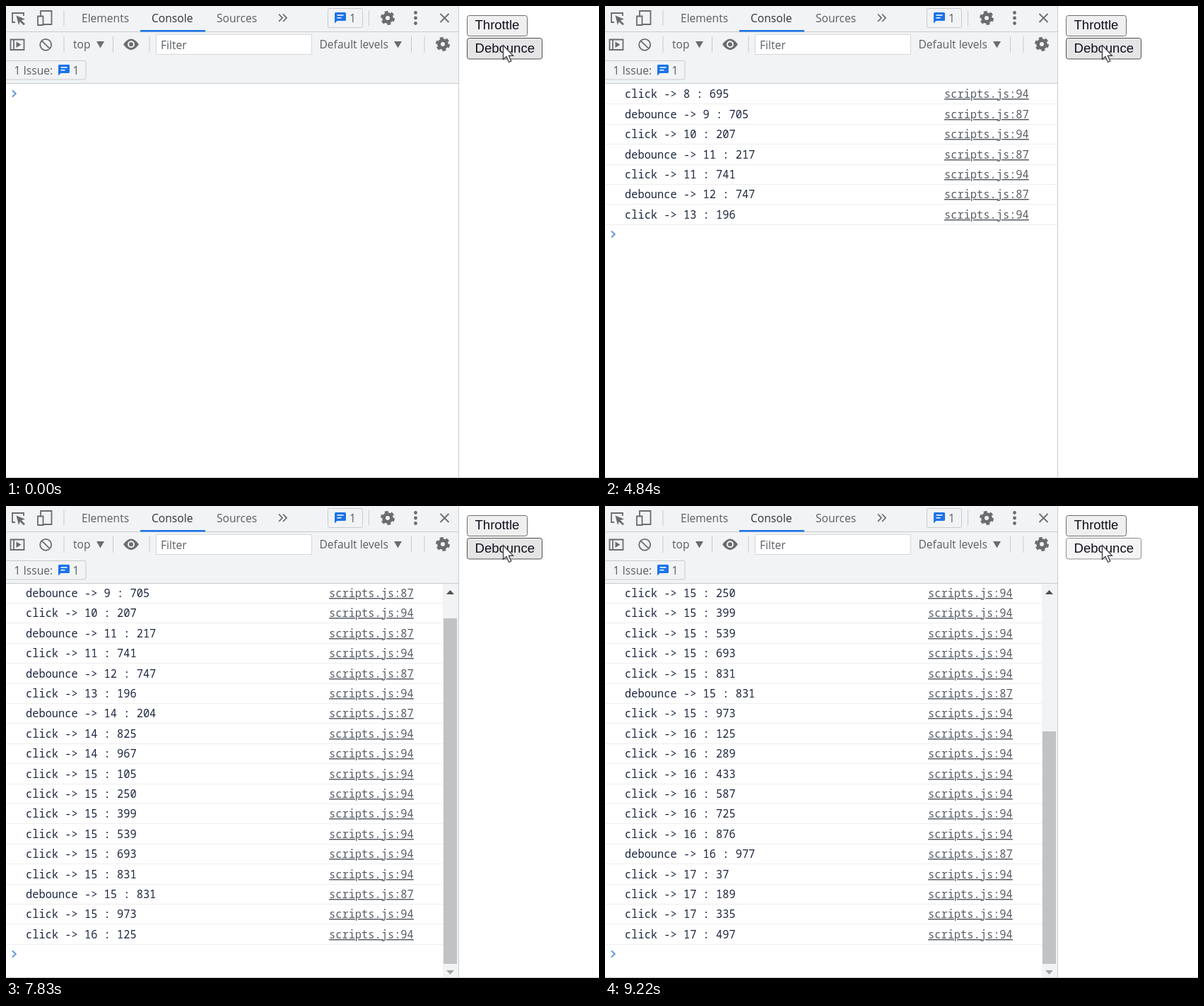
Write an HTML page that moves like this. It is 839 by 668 pixels and loops after 9290 ms.

```html
<!DOCTYPE html>
<html lang="en">
<head>
<meta charset="utf-8">
<title>Debounce console</title>
<style>
  html, body { margin: 0; width: 100%; height: 100%; overflow: hidden; background: #fff; }
  svg { display: block; width: 839px; height: 668px; }
  text { font: 15.6px "Open Sans", sans-serif; fill: #5a5e63; }
  .log text { font: 15.37px "Noto Sans Mono", monospace; fill: #1d2740; }
  .log text + text { fill: #585e65; text-decoration: underline 1px; }
  .log path { stroke: #eee; }
  .btn text { font: 18.55px "Liberation Sans", Arial, sans-serif; fill: #10101e; }
  .btn rect { fill: #efefef; stroke: #6c6c6c; }
  #debounce rect { fill: #e5e5e5; stroke: #4f4f4f; }
  #debounce.down rect { fill: #f5f5f5; stroke: #8d8d8d; }
  .line { stroke: #c8cbcf; fill: none; }
  .icon { fill: none; stroke: #6a6d70; stroke-width: 1.8; }
  .solid { fill: #6a6d70; }
</style>
</head>
<body>
<svg viewBox="0 0 839 668">
  <defs>
    <clipPath id="view"><path d="M0 110H640V667H0z"/></clipPath>
    <g id="gear" class="icon">
      <circle r="5.4" stroke-width="4.8"/>
      <circle r="8.4" stroke-width="3.2" stroke-dasharray="4.8 3.996"/>
    </g>
    <g id="note">
      <path d="M1.5 0H14.5Q16 0 16 1.5V10.5Q16 12 14.5 12H3.5L0 15.5V1.5Q0 0 1.5 0z" fill="#1a73e8"/>
      <path d="M3.5 4H12.5M3.5 7.8H9.5" stroke="#fff" stroke-width="1.6"/>
    </g>
  </defs>

  <g clip-path="url(#view)">
    <g id="rows" class="log"></g>
    <path id="prompt" d="M9 -4.5L13.8 0L9 4.5" fill="none" stroke="#659ad6" stroke-width="2"/>
    <g id="bar">
      <path d="M618 110H640V667H618z" fill="#f1f3f4"/>
      <rect id="thumb" x="619" width="19" fill="#c0c2c4"/>
      <path d="M623 125H634L628.5 119z" fill="#505050"/>
      <path d="M623 657H634L628.5 663z" fill="#a3a3a3"/>
    </g>
  </g>

  <path d="M0 0H640V109H0z" fill="#f1f3f4"/>
  <path class="line" d="M0 36.5H640M0 109.5H640M640.5 0V668M0 667.5H839
    M82 6V28M513.5 6V28M82 43V66M151.5 43V66M203 43V66M573.5 43V66M592 43V66"/>
  <path d="M190 34H282V36.5H190z" fill="#1a73e8"/>

  <!-- tab strip -->
  <path class="icon" d="M13 23H9V10H25V14"/>
  <path class="solid" d="M14.5 13.5L27 18.5L21.8 20.3L27 25.5L25 27.3L19.8 22.2L18 27z"/>
  <path class="icon" d="M49 14V7H64.5V26H53M45 14.5H52.5V27H45z"/>
  <text x="107" y="23">Elements</text>
  <text x="206" y="23" style="fill:#303338">Console</text>
  <text x="298" y="23">Sources</text>
  <path class="icon" d="M386 11.5L391 16.8L386 22M392 11.5L397 16.8L392 22"/>
  <rect class="line" x="455.5" y="3.5" width="49" height="27" rx="2"/>
  <use href="#note" x="465" y="9"/>
  <text x="486" y="23">1</text>
  <use href="#gear" x="540" y="17"/>
  <g class="solid">
    <circle cx="579.5" cy="9.5" r="2.4"/>
    <circle cx="579.5" cy="17" r="2.4"/>
    <circle cx="579.5" cy="24.5" r="2.4"/>
  </g>
  <path class="icon" d="M614.5 11L626.5 23M626.5 11L614.5 23"/>

  <!-- console toolbar -->
  <path class="icon" d="M6.5 47.5H25.5V62H6.5zM11 47.5V62"/>
  <path class="solid" d="M14.5 50.5L21.5 54.8L14.5 59z"/>
  <path class="icon" d="M64.2 54.8A8 8 0 1 1 48.2 54.8A8 8 0 1 1 64.2 54.8M50.5 49.2L61.9 60.4"/>
  <text x="95" y="60">top</text>
  <path class="solid" d="M128 50H139L133.5 59.5zM549 50H560L554.5 59.5z"/>
  <path class="solid" fill-rule="evenodd" d="M166 54.3Q177 38.5 188 54.3Q177 70 166 54.3zM182 54.3A5 5 0 1 0 172 54.3A5 5 0 1 0 182 54.3z"/>
  <circle class="solid" cx="177" cy="54.3" r="3"/>
  <rect x="212.5" y="40.5" width="220" height="28" fill="#fff" stroke="#d5d8dc"/>
  <text x="219" y="61">Filter</text>
  <text x="443.5" y="60">Default levels</text>
  <use href="#gear" x="618" y="54"/>

  <!-- issue bar -->
  <rect class="line" x="-2.5" y="77.5" width="115.5" height="26.5" rx="2"/>
  <text x="11.5" y="96.5">1 Issue:</text>
  <use href="#note" x="74" y="83"/>
  <text x="94.5" y="96.5">1</text>

  <!-- page -->
  <g class="btn">
    <rect x="652.5" y="13.5" width="85" height="29" rx="3"/>
    <text x="663.5" y="33">Throttle</text>
  </g>
  <g class="btn" id="debounce">
    <rect x="652.5" y="45.5" width="106" height="29.5" rx="3"/>
    <text x="663.5" y="66">Debounce</text>
  </g>
  <circle id="ring" cx="702.5" cy="55" r="17" fill="#c6a26a" opacity=".8"/>
  <path d="M703.5 55.5V75.5L708 71.5L711.5 79.5L714.8 78L711.3 70.3H717.5z" fill="#fff" stroke="#33343c" stroke-width="1.2"/>
</svg>
<script>
const LOOP = 9290, PITCH = 28.4, FIT = 18, LAG = 70;

// [stamp, release or firing time, how long the button was held (0 = debounced call)]
const log = [
  ['8 : 695', 330, 130], ['9 : 705', 1340, 0],
  ['10 : 207', 1880, 140], ['11 : 217', 2820, 0],
  ['11 : 741', 3360, 140], ['12 : 747', 4360, 0],
  ['13 : 196', 4840, 150], ['14 : 204', 5840, 0],
  ['14 : 825', 6440, 70], ['14 : 967', 6580, 70],
  ['15 : 105', 6730, 80], ['15 : 250', 6870, 70],
  ['15 : 399', 7010, 70], ['15 : 539', 7140, 70],
  ['15 : 693', 7340, 130], ['15 : 831', 7480, 70], ['15 : 831', 7550, 0],
  ['15 : 973', 7620, 70], ['16 : 125', 7760, 70],
  ['16 : 289', 7960, 70], ['16 : 433', 8100, 70],
  ['16 : 587', 8240, 70], ['16 : 725', 8390, 70],
  ['16 : 876', 8530, 70], ['16 : 977', 8670, 0],
  ['17 : 37', 8670, 70], ['17 : 189', 8810, 70],
  ['17 : 335', 8950, 70], ['17 : 497', 9150, 70]
];

const $ = id => document.getElementById(id);
const show = (el, on) => el.setAttribute('visibility', on ? 'inherit' : 'hidden');
const move = (el, y) => el.setAttribute('transform', `translate(0 ${y})`);

// The console falls behind once the clicks come fast.
const shownAt = ([, at, hold]) => hold && at > 7400 ? at + LAG : at;

// A longer hold shows the pressed button first, then the ring.
const presses = log.filter(r => r[2]).map(([, end, hold]) => {
  const start = end - hold;
  return { start, end, ring: hold === 130 || hold === 140 ? start + 70 : start };
});
presses.push({ start: 9220, end: LOOP, ring: LOOP });

$('rows').innerHTML = log.map(([stamp, , hold]) => {
  const [name, line] = hold ? ['click', 94] : ['debounce', 87];
  return `<g><text x="28">${name} -&gt; ${stamp}</text>` +
    `<text>scripts.js:${line}</text><path d="M0 8.5H640"/></g>`;
}).join('');
const rows = [...$('rows').children];

function draw(t) {
  const count = log.filter(r => shownAt(r) <= t).length;
  const extra = count - FIT - 1;
  const scrolled = extra >= 0;
  const shift = scrolled ? Math.ceil(29.6 + PITCH * extra) - 0.3 : 0;

  rows.forEach((row, i) => {
    show(row, i < count);
    move(row, Math.round(130.35 + PITCH * i - shift));
    row.children[1].setAttribute('x', scrolled ? 457 : 480);
  });
  move($('prompt'), Math.round(123.7 + PITCH * count - shift));

  show($('bar'), scrolled);
  const size = 515 * 557 / (557 + shift);
  $('thumb').setAttribute('y', Math.round(648 - size));
  $('thumb').setAttribute('height', Math.round(size));

  const press = presses.find(p => t >= p.start && t < p.end);
  $('debounce').classList.toggle('down', !!press);
  show($('ring'), press && t >= press.ring);
}

const begin = performance.now();
function tick() {
  draw((performance.now() - begin) % LOOP);
  requestAnimationFrame(tick);
}
tick();
</script>
</body>
</html>
```
